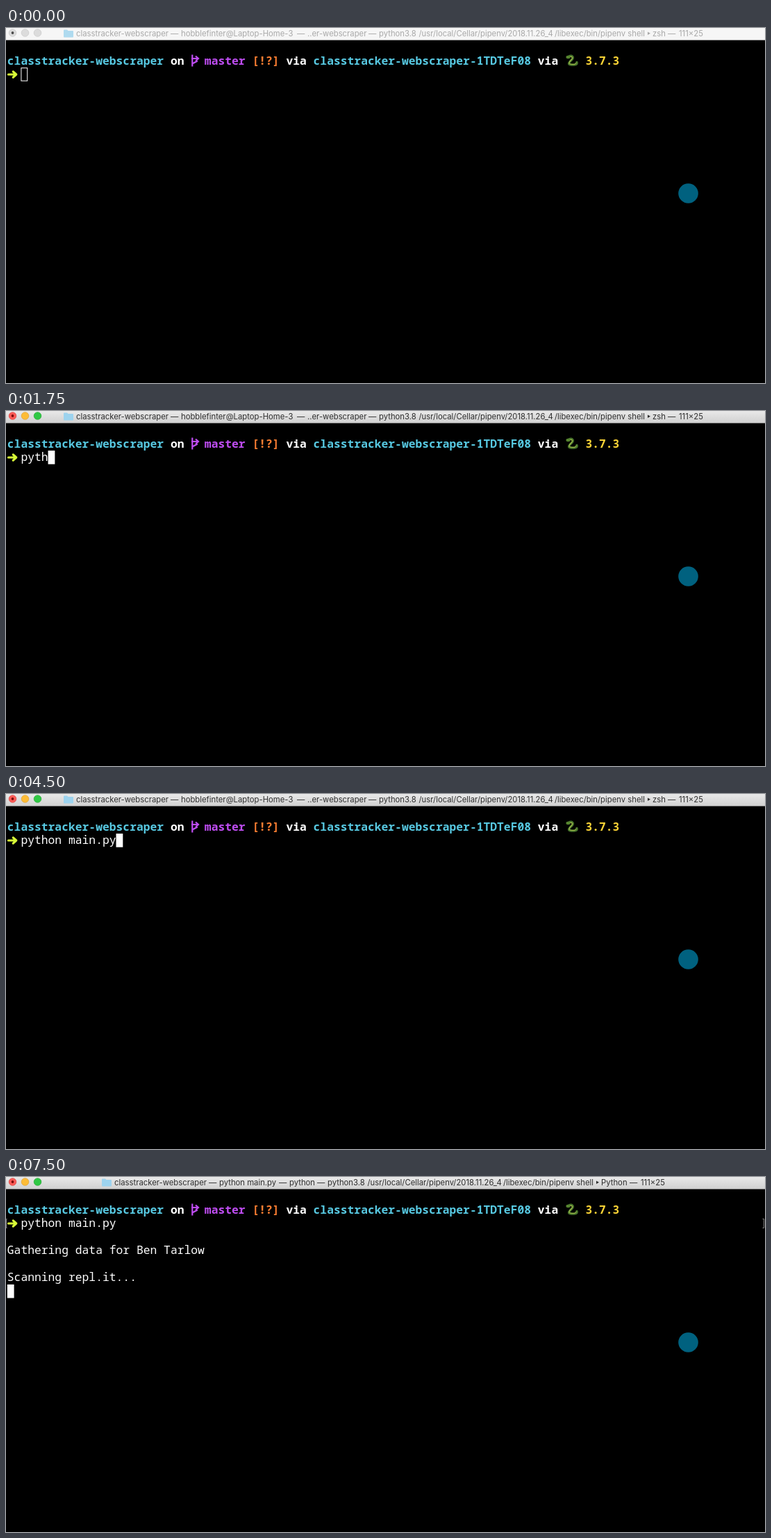
An HTML page for the animation above (8 s loop, 1093x512 px).

```html
<!DOCTYPE html>
<html lang="en">
<head>
<meta charset="utf-8">
<title>Terminal</title>
<style>
  html, body { margin: 0; width: 100%; height: 100%; overflow: hidden; background: #000; }
  svg { display: block; width: 1093px; height: 512px; }
  .term text { font: 500 16.33px "Noto Sans Mono", monospace; fill: #fff; }
  .term .bold text { font-weight: 700; }
  .title text { font: 11.3px Inter, sans-serif; }
  .title { fill: #2f2f2f; }
  .idle .title { fill: #a9a9a9; }
  .folder { fill: #9dd3ee; }
  .idle .folder { opacity: .8; }
  .idle .light { fill: #dcdcdc; stroke: #c9c9c9; }
  .idle .dot { fill: #4c4c4c; }
  .idle .bar { fill: #f6f6f6; }
</style>
</head>
<body>
<svg id="stage" viewBox="0 0 1093 512">
  <defs>
    <linearGradient id="chrome" x2="0" y2="1">
      <stop offset="0" stop-color="#e9e9e9"/>
      <stop offset="1" stop-color="#d0d0d0"/>
    </linearGradient>
  </defs>
  <rect width="1093" height="512"/>
  <rect class="bar" width="1093" height="17.5" fill="url(#chrome)"/>
  <g stroke-width=".7">
    <circle class="light" cx="9.5" cy="7" r="5.3" fill="#fb5b56" stroke="#df4744"/>
    <circle class="light" cx="27.5" cy="7" r="5.3" fill="#fdbc36" stroke="#dea032"/>
    <circle class="light" cx="45.5" cy="7" r="5.3" fill="#2fc844" stroke="#27aa35"/>
    <circle class="dot" cx="9.5" cy="7" r="1.9" fill="#7c0d0c"/>
  </g>
  <g id="title" class="title"></g>

  <g class="term">
    <g id="prompt" class="bold"></g>
    <g fill="none" stroke="#bf4df2" stroke-width="2.2">
      <path d="M268.3 38.5V55.5M268.3 51.5L275.8 47.5M267 44H277"/>
      <path d="M273 40.5L277 44L273 47.5"/>
    </g>
    <g fill="none" stroke-linecap="round">
      <path d="M810 41.5C815 38.5 818 42 815 45.5C811 49 808 53 814 53C819 53 823 53 822 49.5" stroke="#47752c" stroke-width="3.4"/>
      <path d="M812 41.5C816 41 817 43 814 46C810 50 810 52 814 52.3C818 53 821 52 821 50" stroke="#a4b94b" stroke-width="1.1"/>
      <ellipse cx="809.5" cy="42" rx="3" ry="2.2" fill="#56852f"/>
    </g>
    <path d="M3.5 67H14M10.3 62.9L14.8 67L10.3 71.1" fill="none" stroke="#d7fb37" stroke-width="3.2" stroke-linecap="round" stroke-linejoin="round"/>
    <g id="command"></g>
    <g id="marks" fill="none" stroke="#858585">
      <path d="M1.5 60.5H.5V73.5H1.5M1089.5 60.5H1091.5V73.5H1089.5"/>
    </g>
    <g id="output"></g>
    <rect id="cursor"/>
  </g>

  <circle id="disc" cx="982.5" cy="238.5" r="14.3" fill="#00617f"/>
  <circle id="ring" cx="982.5" cy="253" fill="none" stroke-width="2.4"/>
</svg>
<script>
const $ = id => document.getElementById(id);
const LOOP = 8000, COL = 9.795, ROW = 19.57, LEFT = 1.8;
const colX = c => LEFT + c * COL;
const rowY = r => 18 + r * ROW;

const set = (el, attrs) => { for (const k in attrs) el.setAttribute(k, attrs[k]); };
const show = (el, on) => el.setAttribute("visibility", on ? "visible" : "hidden");

function make(parent, tag, attrs, text = "") {
  const el = document.createElementNS("http://www.w3.org/2000/svg", tag);
  set(el, attrs);
  el.textContent = text;
  return parent.appendChild(el);
}

const put = (parent, col, row, text, fill = "#fff") =>
  make(parent, "text", { x: colX(col), y: rowY(row) + 15, style: "fill:" + fill }, text);

// Title bar: folder, then parts joined by dashes
function buildTitle(x, middle, pathX, shell, shellX, sizeX) {
  const g = make($("title"), "g", {});
  const say = (x, text, anchor = "start") =>
    make(g, "text", { x, y: 11.5, "text-anchor": anchor }, text);
  make(g, "path", {
    class: "folder",
    d: `M${x - 18} 3.5q0-1 1-1h4l1.5 1.5h6.5q1 0 1 1v7.5q0 1-1 1h-12q-1 0-1-1z`
  });
  say(x, "classtracker-webscraper");
  for (const [mx, text] of middle) say(mx, text);
  for (const px of [...middle.map(m => m[0]), pathX, sizeX]) say(px - 15, "—");
  say(pathX, "python3.8");
  say(pathX + 57.5, "/usr/local/Cellar/pipenv/2018.11.26_4");
  say(shellX - 11, "/libexec/bin/pipenv shell", "end");
  make(g, "path", { d: `M${shellX - 7} 5.5l4 2.2l-4 2.2z` });
  say(shellX, shell);
  say(sizeX + 1, "111×25");
  return g;
}

const titles = [
  buildTitle(101, [[252, "hobblefinter@Laptop-Home-3"], [434, "..er-webscraper"]], 537, "zsh", 931, 968),
  buildTitle(165, [[316, "python main.py"], [417, "python"]], 472, "zsh", 866, 903),
  buildTitle(156, [[307, "python main.py"], [408, "python"]], 463, "Python", 857, 913)
];

const CYAN = "#57c8e1";
[
  [0, "classtracker-webscraper", CYAN], [24, "on"], [29, "master", "#bf4df2"],
  [36, "[!?]", "#ff7f32"], [41, "via"], [45, "classtracker-webscraper-1TDTeF08", CYAN],
  [78, "via"], [85, "3.7.3", "#fdd436"]
].forEach(([col, text, fill]) => put($("prompt"), col, 1, text, fill));

const COMMAND = "python main.py";
const typed = put($("command"), 2, 2, "");
put($("output"), 0, 4, "Gathering data for Ben Tarlow");
put($("output"), 0, 6, "Scanning repl.it...");

// [time, characters typed]
const KEYS = [[0, 0], [1000, 1], [1500, 2], [1750, 4], [2000, 5], [2250, 6], [2500, 7],
  [2750, 8], [3000, 10], [3250, 11], [3750, 12], [4000, 13], [4500, 14]];
// [time, radius, colour]; radius 0 shows the disc
const CLICK = [[0, 0], [250, 17.3, "#07323f"], [500, 18.3, "#052530"], [750, 19.2, "#03161d"], [1000, 0]];

const at = (steps, t) => steps.filter(s => s[0] <= t).pop();

function draw(t) {
  const idle = t < 250, ran = t >= 5000, done = t >= 5750;
  $("stage").setAttribute("class", idle ? "idle" : "");
  const current = t < 5000 ? 0 : t < 5250 ? 1 : 2;
  titles.forEach((g, i) => show(g, i === current));

  const count = at(KEYS, t)[1];
  typed.textContent = COMMAND.slice(0, count);
  show($("marks"), ran);
  show($("output"), done);

  const row = done ? 7 : ran ? 3 : 2;
  const inset = idle ? .5 : 0;
  set($("cursor"), {
    x: colX(ran ? 0 : 2 + count) + inset, y: rowY(row) + inset,
    width: COL - 2 * inset, height: ROW - 2 * inset,
    fill: idle ? "none" : "#fff", stroke: idle ? "#fff" : "none"
  });

  const [, r, stroke] = at(CLICK, t);
  show($("disc"), !r);
  show($("ring"), r);
  if (r) set($("ring"), { r, stroke });
}

const start = performance.now();
function tick() {
  draw((performance.now() - start) % LOOP);
  requestAnimationFrame(tick);
}
tick();
</script>
</body>
</html>
```
